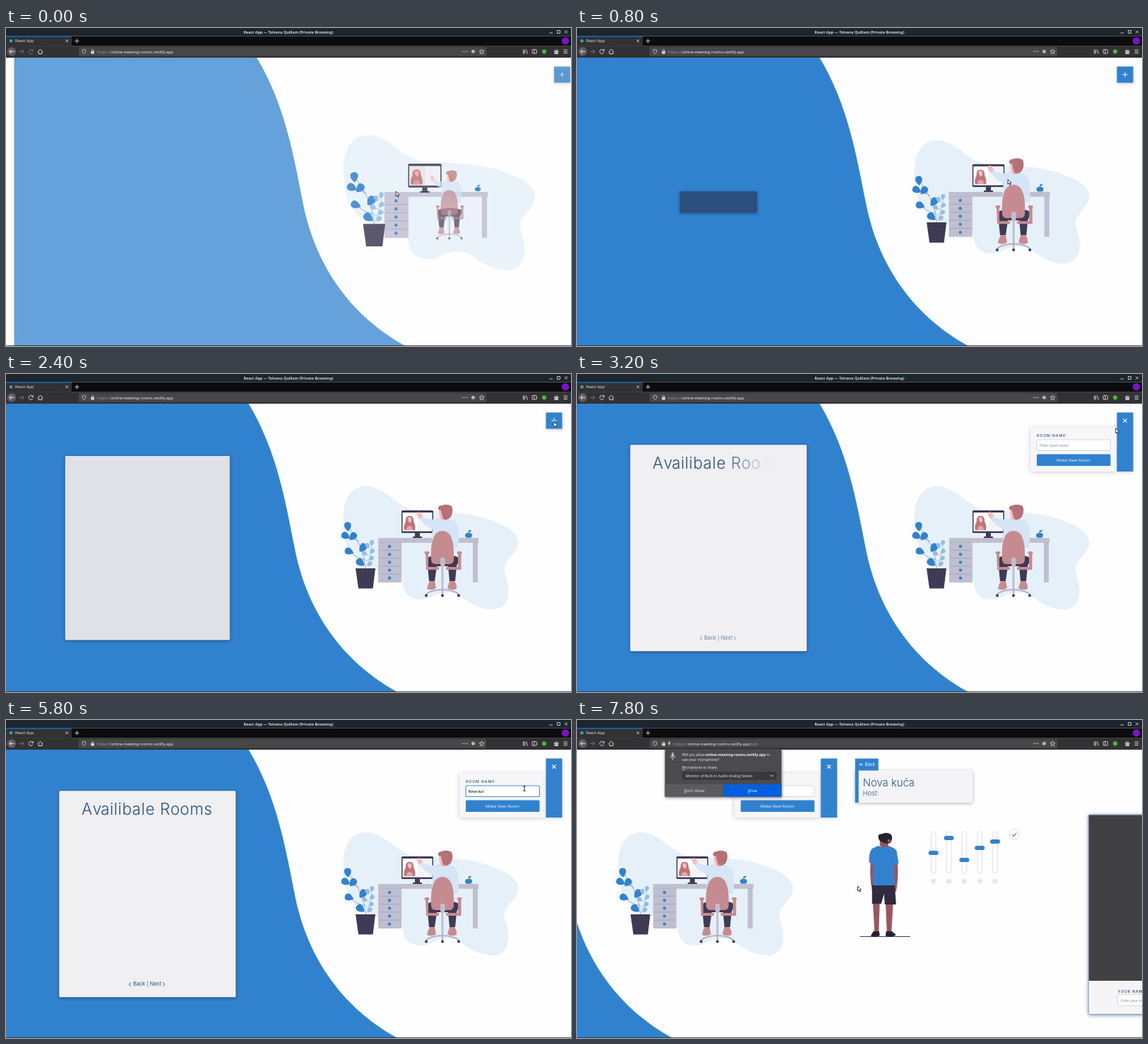
These frames come from a looping animation (800x450 px, 8 s). An HTML page with a canvas:

```html
<!DOCTYPE html>
<html lang="en">
<head>
<meta charset="utf-8">
<title>Online meeting rooms</title>
<style>
html, body { margin: 0; width: 100%; height: 100%; overflow: hidden; background: #fefdff; }
canvas { display: block; width: 100vw; height: 100vh; }
</style>
</head>
<body>
<canvas id="stage" width="800" height="450"></canvas>
<script>
const c = document.getElementById('stage').getContext('2d');
const LOOP = 8000, STEP = 200;
const BLUE = '#3182ce', DARK = '#3f3a55', ROSE = '#c58b91', SKIN = '#f9b9bd', NAVY = '#2c5282';
const UI = '"Open Sans", "Noto Sans", sans-serif';
const HEAD = 'Inter, "Open Sans", sans-serif';
const ROOM = 'Nova kuća';

const clamp = v => Math.max(0, Math.min(1, v));
const lerp = (a, b, p) => a + (b - a) * p;
const ramp = (t, a, b) => clamp((t - a) / (b - a));
const easeOut = p => 1 - (1 - p) ** 2;
const easeInOut = p => p < .5 ? 2 * p * p : 1 - 2 * (1 - p) ** 2;

// Value of [time, ...numbers] keys at time t.
function track(keys, t) {
  let i = 0;
  while (i < keys.length - 2 && t >= keys[i + 1][0]) i++;
  const [a, b] = [keys[i], keys[i + 1]];
  const p = ramp(t, a[0], b[0]);
  return a.slice(1).map((v, k) => lerp(v, b[k + 1], p));
}

function rect(x, y, w, h, color, r = 0) {
  c.fillStyle = color;
  c.beginPath();
  c.roundRect(x, y, w, h, r);
  c.fill();
}
function frame(x, y, w, h, color, r = 0, lw = 1) {
  c.strokeStyle = color;
  c.lineWidth = lw;
  c.beginPath();
  c.roundRect(x, y, w, h, r);
  c.stroke();
}
function dot(x, y, r, color) {
  c.fillStyle = color;
  c.beginPath();
  c.arc(x, y, r, 0, 7);
  c.fill();
}
function fill(d, color) {
  c.fillStyle = color;
  c.fill(new Path2D(d));
}
function line(d, color, lw = 1) {
  c.strokeStyle = color;
  c.lineWidth = lw;
  c.stroke(new Path2D(d));
}
function text(s, x, y, font, color, align = 'left', gap = 0) {
  c.font = font;
  c.fillStyle = color;
  c.textAlign = align;
  c.letterSpacing = gap + 'px';
  c.fillText(s, x, y);
}
function saved(draw) {
  c.save();
  draw();
  c.restore();
}
function shadow(blur, color, dy = 1) {
  c.shadowBlur = blur;
  c.shadowColor = color;
  c.shadowOffsetY = dy;
}

// Letters fade in one after another; p is the fade of the first letter.
function reveal(s, x, y, font, color, p, gap = 0) {
  c.font = font;
  c.letterSpacing = gap + 'px';
  [...s].forEach((ch, i) => saved(() => {
    c.globalAlpha *= clamp(p - .25 * i);
    text(ch, x + c.measureText(s.slice(0, i)).width, y, font, color, 'left', gap);
  }));
}

// ---- desk scene ----
function leaf(x, y, turn, size, color) {
  saved(() => {
    c.translate(x, y);
    c.rotate(turn);
    c.scale(size, size);
    fill('M0 7C-3 4-5.5 1-5-3C-4.5-8 4.5-8 5-3C5.5 1 3 4 0 7Z', color);
  });
}
function backdrop() {
  fill('M478 215C476 190 481 159 510 159C540 160 551 189 582 193C622 195 662 195 694 210' +
    'C718 218 727 232 725 241C721 258 703 264 706 280C709 292 713 300 711 314' +
    'C707 336 688 336 668 329C646 320 644 309 625 309C605 310 602 320 584 319' +
    'C565 317 562 304 560 286C550 277 520 284 500 266C482 250 480 235 478 215Z', '#e6f0f8');
}
function plant() {
  const light = '#93bce6';
  line('M509 275Q508 246 484 215M508 262Q500 262 488 253M506 252L505 244M500 237L481 229M497 234L492 231', '#7f93b5', .7);
  line('M509 275Q518 258 518 238M513 265L506 262M515 257L508 254', light, .7);
  leaf(484, 216, -.1, .95, BLUE);
  leaf(481, 229, -1.1, .95, BLUE);
  leaf(491, 230, .7, .95, BLUE);
  leaf(486, 251, -1.2, .95, BLUE);
  leaf(505, 246, .65, 1, BLUE);
  leaf(502, 267, -.9, 1, BLUE);
  [[518, 239, .2], [512, 243, -.5], [518, 251, .8], [508, 254, -.9], [517, 261, .9], [515, 269, .7]]
    .forEach(([x, y, a]) => leaf(x, y, a, .6, light));
  fill('M495 275H523L519.5 303.5H499Z', DARK);
}
function desk() {
  rect(527, 232, 142, 6, '#c0bfd0');
  rect(661, 238, 7, 57, '#c0bfd0');
  rect(527, 238, 33, 57, '#c0bfd0');
  for (let i = 0; i < 5; i++) {
    if (i) line(`M528 ${238 + 11.3 * i}H559`, '#9c9bb0', .7);
    dot(543, 244 + 11.2 * i, 2.2, BLUE);
  }
  line('M527 238.5H669', '#aeadc2', .6);
}
function monitor() {
  rect(560, 193, 45, 32, DARK, 1.5);
  rect(561.5, 196, 42, 26.5, '#fff');
  rect(583, 197, 20, 24, '#f3f4fa');
  fill('M564 221C562 213 566 212 566 206C566 199 577 199 577 206C577 212 581 213 579 221Z', '#bd767a');
  fill('M568.5 204.500C569 201.500 574.5 201.5 574.5 206C574 212 570 212 568.5 204.500Z', SKIN);
  fill('M567 221C567 213 576 213 576 221Z', '#e5a5aa');
  rect(579, 225, 7, 6, DARK);
  rect(576, 230, 13, 2, DARK);
}
function person() {
  fill('M596 262C596 254 642 254 642 262L638 272L636 293H628L626 272H610L607 293H599Z', DARK);
  fill('M600 293H607L609 303Q603 307 596 304Q597 298 600 293ZM628 293H635Q639 299 638 304Q631 307 625 303Z', ROSE);
  fill('M614 203C606 208 596 206 589 200L585 204C592 214 600 218 604 219L602 246H640Q645 212 632 206Z', '#d5e5f6');
  fill('M590 201L586 205Q581 202 582 196Q587 193 590 201Z', SKIN);
  fill('M613 193H622L625 206Q617 210 615 204Q613 199 613 193Z', SKIN);
  fill('M612 192Q611 186 617 186Q624 183 631 187Q634 194 630 202Q625 208 619 205Q617 199 616 193Z', '#b37276');
  fill('M602 262C601 241 604 222 618 222C632 222 635 241 634 262Q634 269 628 269H608Q602 269 602 262Z', ROSE);
  fill('M594 252H598V273H613V277H595ZM640 252H644.5V277H623V273H640Z', ROSE);
  rect(592.5, 251, 7, 4, ROSE, 2);
  rect(638.5, 251, 7, 4, ROSE, 2);
  rect(615, 260, 6.5, 12, '#c0bfd0', 2);
  rect(616.5, 272, 3, 33, '#c0bfd0');
  line('M595 312Q600 306 618 305Q636 306 641 312M618 303V312', '#b5b4c6', 2.2);
  [595, 618, 641].forEach(x => dot(x, 313.5, 2, DARK));
}
function apple() {
  dot(653.5, 228.3, 3.4, BLUE);
  dot(656.5, 228.3, 3.4, BLUE);
  line('M655 225Q655 222 656 221', DARK, .9);
  fill('M655 224Q656 220 659 221Q658 224 655 224Z', BLUE);
}

// [draw, centre, [scale, dx, dy, alpha] at load, the same one step later]
const parts = [
  [backdrop, 600.5, 245.5, [1.097, 12, 1, .74], [1.017, 3, .5, .94]],
  [desk, 598, 263.5, [1.03, 11, 1, .8], [1.12, 2, 2.5, .98]],
  [plant, 499, 257, [1.12, 11, 0, .85], [1.02, 1.8, 1.3, .98]],
  [monitor, 582.5, 212.5, [1.05, 10.5, 0, .85], [1.14, .5, -3, 1]],
  [person, 619, 250.5, [.75, 9.5, 0, .7], [1.1, 2, 0, 1]],
  [apple, 655, 227, [.85, 13, 0, .85], [1, 9.5, -2, 1]],
];
const rest = [1, 0, 0, 1];
const settle = t => t >= 1400 ? 0 : Math.exp((200 - t) / 220);

function scene(t) {
  for (const [draw, x, y, first, second] of parts) {
    const [s, dx, dy, alpha] = t < 200 ? first : rest.map((v, i) => lerp(v, second[i], settle(t)));
    saved(() => {
      c.globalAlpha = alpha;
      c.translate(x + dx, y + dy);
      c.scale(s, s);
      c.translate(-x, -y);
      draw();
    });
  }
}

// ---- first page ----
function card(t) {
  if (t < 200) return;
  const [cx, bw, bh] = track([[200, 202.5, 45, 12.5], [400, 201, 82, 22], [600, 200.3, 102, 28], [800, 200.3, 109, 30]], t);
  const [p] = track([[2000, 0], [2200, .58], [2400, .88], [2600, .97], [2800, 1]], t);
  const w = lerp(bw, 250, p), h = lerp(bh, 292, p);
  const x = cx - w / 2, y = 246.3 - h / 2;
  const mix = (a, b) => Math.round(lerp(a, b, clamp(p * 1.04)));
  saved(() => {
    shadow(4.5, `rgba(15,35,70,${lerp(.35, .6, ramp(t, 200, 800))})`, 1);
    rect(x, y, w, h, `rgb(${mix(42, 240)},${mix(79, 239)},${mix(124, 241)})`, 1.5);
  });
  if (p < .3) reveal('See Availibale Rooms', 161, 249, `7.6px ${HEAD}`, '#f4f7fb', (t - 1200) / 170);
  if (t >= 2800) {
    reveal('Availibale Rooms', 107, 134, `300 22.4px ${HEAD}`, NAVY, (t - 2600) / 170, .6);
    saved(() => {
      c.globalAlpha = ramp(t, 2800, 3400);
      text('Back | Next', 200, 376, `7.4px ${HEAD}`, NAVY, 'center');
      line('M177 371L174 374L177 377M222 371L225 374L222 377', NAVY, .8);
    });
  }
}

function roomForm(t, shift) {
  const p = easeOut(ramp(t, 2500, 3200));
  const [alpha] = track([[0, .74], [200, .94], [400, 1]], t);
  const left = 764 - 122 * p;
  saved(() => {
    c.globalAlpha = alpha;
    c.translate(shift, 0);
    if (p > 0) {
      saved(() => {
        shadow(6, 'rgba(0,0,0,.2)');
        rect(left, 75, 122 * p, 63, '#f7f7f9', 2);
      });
      saved(() => {
        c.beginPath();
        c.rect(left, 70, 122 * p, 70);
        c.clip();
        c.globalAlpha = ramp(p, .4, 1);
        text('ROOM NAME:', 651, 89, `600 5.2px ${HEAD}`, '#4a6384', 'left', .9);
        const sent = t >= 7200, focus = t >= 3800 && !sent;
        rect(651, 93, 104.5, 15.5, '#fff', 2);
        frame(651, 93, 104.5, 15.5, focus ? '#4590d6' : '#cbd0d8', 2, focus ? 1.1 : .8);
        const typed = t < 5000 || sent ? '' : ROOM.slice(0, Math.ceil((t - 4800) / 200 * 1.5));
        if (typed) text(typed, 654.5, 103, `italic 600 5.3px ${UI}`, '#22262e');
        else if (!sent) text('Enter room name', 655, 103, `italic 5.3px ${UI}`, '#7d8087');
        if (focus && !typed) line('M654.5 97.5V104.5', '#333', .7);
        rect(651, 113.5, 104.5, 16.5, BLUE, 1.5);
        text('Make New Room', 703, 124, `6.1px ${UI}`, '#f2f7fc', 'center');
      });
    }
    saved(() => {
      shadow(5, 'rgba(0,0,0,.22)');
      rect(764.5, 54.5, 23, lerp(23, 83.5, p), BLUE);
    });
    c.translate(776, 66);
    c.rotate(p * Math.PI / 4);
    line('M-3.8 0H3.8M0-3.8V3.8', '#fff', lerp(.9, 1.1, p));
  });
}

function firstPage(t) {
  const [shift, alpha] = track([[0, 11.5, .74], [200, 2, .94], [400, .5, .99], [600, 0, 1]], t);
  saved(() => {
    c.globalAlpha = alpha;
    c.translate(shift, 0);
    fill('M0 40H342L343.5 42C384.5 110 396.5 185 409.5 250C422.5 315 460 398 554 450H0Z', BLUE);
  });
  scene(t);
  card(t);
  roomForm(t, shift);
}

// ---- second page ----
function standing() {
  const brown = '#9d555c', black = '#25222f';
  line('M20 306.5H91', '#3f3d56', 1.2);
  fill('M38 255H48L46.5 300H40.5ZM56 255H67L64.5 300H58Z', brown);
  fill('M39 299H47L48 305Q42 308 35 305.5ZM57 299H65L71 304Q67 308 56 305.5Z', black);
  fill('M35 200H40L39 220L41 240L37 241Q33 222 35 200ZM67 200H73Q75 222 71 243L66 242Z', brown);
  fill('M37 232H69L71 261H55L54 246L50 260H37Z', '#2f2b40');
  fill('M46 178Q53 181 60 178Q70 181 72 186L74.5 203L68 204L69 234H38L39 203L33 202Q32 188 37 182Z', BLUE);
  fill('M48 168H60V179Q53 182 48 178Z', brown);
  fill('M46 167Q44 161 52 161Q58 158 64 162Q67 167 63 174Q55 176 50 172Q47 171 46 167Z', black);
  dot(61, 171, 2.3, brown);
}
function secondPage() {
  saved(() => {
    shadow(5, 'rgba(0,0,0,.3)');
    rect(13, 71, 166.5, 46, '#f4f4f6', 2);
  });
  rect(13, 54.5, 33, 17, BLUE, 1);
  rect(13, 70, 5, 47, BLUE, 1);
  line('M24 63H19.5M21.5 61L19.5 63L21.5 65', '#fff', .8);
  text('Back', 27, 65.3, `6.4px ${UI}`, '#fff');
  text(ROOM, 24, 94, `300 14.8px ${HEAD}`, NAVY);
  text('Host:', 24, 107, `300 9.4px ${HEAD}`, NAVY);
  standing();
  [188, 167, 198, 181, 172].forEach((y, i) => {
    const x = 124 + 21.8 * i;
    frame(x - 3.3, 158, 6.6, 59, '#dedee3', 3, .9);
    rect(x - 7, y - 3, 14, 6, BLUE, 3);
    dot(x, 228, 3.5, '#e6e5e9');
  });
  c.strokeStyle = '#cfd3dc';
  c.lineWidth = .8;
  c.beginPath();
  c.arc(238.5, 162, 7, 0, 7);
  c.stroke();
  line('M235.5 162L237.5 164.5L241.5 159.5', BLUE, 1.1);
  saved(() => {
    shadow(5, 'rgba(20,50,90,.6)');
    rect(343.5, 134, 436, 282.5, '#f5f5f7', 2);
  });
  frame(343.5, 134, 436, 282.5, '#6a9cc4', 2, .8);
  rect(344, 134.5, 435, 234.5, '#414042');
  text('YOUR NAME:', 385, 386, `600 5.2px ${HEAD}`, '#3f5878', 'left', .9);
  rect(385, 388.5, 150, 16, '#fff', 2);
  frame(385, 388.5, 150, 16, '#cbd0d8', 2, .8);
  text('Enter your name', 389, 398.5, `italic 5.3px ${UI}`, '#7d8087');
}

// ---- browser ----
function mic(x, y, s, color) {
  rect(x - s * .3, y - s, s * .6, s * 1.2, color, s * .3);
  line(`M${x - s * .6} ${y - s * .2}Q${x - s * .5} ${y + s * .5} ${x} ${y + s * .5}Q${x + s * .5} ${y + s * .5} ${x + s * .6} ${y - s * .2}M${x} ${y + s * .5}V${y + s}`, color, s * .18);
}
function browser(t) {
  const pale = '#d6d6da', dim = '#77777c', asking = t >= 7600;
  rect(0, 0, 800, 11.5, '#1d252d');
  text('React App — Tolvena Quillam (Private Browsing)', 400, 7.7, `bold 5.3px ${UI}`, '#d0d5d9', 'center');
  line('M769.5 7H774M791 3.5L795 7.5M795 3.5L791 7.5', pale, .9);
  frame(780.5, 3.5, 4, 4, pale, 0, .9);
  rect(0, 11.5, 800, 14, '#0c0c0e');
  rect(0, 11.5, 93, 14, '#323234');
  rect(0, 11.3, 93, 1.2, '#0a74d8');
  dot(7, 18.3, 2.3, '#3f9fb8');
  text('React App', 13, 20.3, `5.6px ${UI}`, '#f0f0f2');
  line('M84.5 16.5L88 20M88 16.5L84.5 20M97.5 18.3H103.5M100.5 15.3V21.3', pale, .9);
  dot(792, 18.3, 5.2, '#7c12c8');

  rect(0, 25.3, 800, 16.7, '#323234');
  dot(8, 33.3, 6.3, '#5b5b5f');
  line('M11.5 33.3H5M7.8 30.3L5 33.3L7.8 36.3', '#f0f0f2', 1);
  line('M18.5 33.3H25M22.2 30.3L25 33.3L22.2 36.3', dim, 1);
  line('M37.6 31.5A3 3 0 1 0 38 34.5M38.4 29.8V32.3H36', t < 200 ? dim : pale, 1);
  line('M45 33.5L48.5 30L52 33.5M46 33V36.5H51V33', pale, 1);
  rect(103, 27, 577, 12.7, '#47474a', 1.5);
  line('M110.5 30.3L113 31.2Q113 35.5 110.5 36.6Q108 35.5 108 31.2Z', pale, .8);
  rect(120.3, 32.8, 4.6, 3.6, pale, .5);
  line('M121.2 33V31.5Q122.6 29.5 124 31.5V33', pale, .8);
  if (asking) mic(130.5, 33.3, 3, pale);
  const x = asking ? 137 : 129, font = `5.7px ${UI}`;
  text('https://', x, 35.5, font, '#9b9b9f');
  let end = x + c.measureText('https://').width;
  text('online-meeting-rooms.netlify.app', end, 35.5, font, '#f5f5f7');
  end += c.measureText('online-meeting-rooms.netlify.app').width;
  if (t >= 7200) text('/join', end, 35.5, font, '#9b9b9f');
  [647, 650, 653].forEach(v => dot(v, 33.3, .8, pale));
  dot(661.5, 33.3, 2.5, '#b4b4b8');
  line('M673.5 30L674.5 32.3L677 32.5L675 34.2L675.7 36.7L673.5 35.3L671.3 36.7L672 34.2L670 32.5L672.5 32.3Z', pale, .8);
  line('M732.5 30.5V36.5M734.5 30.5V36.5M736.5 30.5L738.5 36.5', pale, 1);
  frame(745, 30.5, 6.5, 5.5, pale, 1, .9);
  line('M748 30.5V36', pale, .9);
  dot(762, 33.3, 3.1, '#4fb53c');
  rect(776, 32, 6.5, 1.6, pale);
  rect(776.6, 34.2, 5.3, 2.6, pale);
  line('M777.5 30L779.3 31.8L781 30', pale, .8);
  line('M789.5 31H795M789.5 33.3H795M789.5 35.6H795', pale, .9);
  rect(0, 449.2, 800, .8, '#26282b');
  if (asking) permission();
}
function permission() {
  const ink = '#f1f1f3', font = `5.1px ${UI}`, bold = `bold 5.1px ${UI}`;
  saved(() => {
    shadow(4, 'rgba(0,0,0,.5)');
    rect(124.5, 41, 165, 67.5, '#4a4a4f');
  });
  mic(135.5, 51.5, 5.5, '#b9b9bd');
  text('Will you allow ', 148.5, 51, font, ink);
  const x = 148.5 + c.measureText('Will you allow ').width;
  text('online-meeting-rooms.netlify.app', x, 51, bold, ink);
  text(' to', x + c.measureText('online-meeting-rooms.netlify.app').width, 51, font, ink);
  text('use your microphone?', 148.5, 57.5, font, ink);
  text('Microphone to share:', 148.5, 69, font, ink);
  line('M148.5 70.3H153', ink, .5);
  rect(148, 72.5, 135, 13, '#38383d', 1);
  frame(148, 72.5, 135, 13, '#54545a', 1, .7);
  text('Monitor of Built-in Audio Analog Stereo', 154, 80.7, `5.2px ${UI}`, ink);
  line('M273.5 78L275.5 80L277.5 78', ink, 1);
  rect(124.5, 91, 83, 17.5, '#5a5a5f');
  rect(207.5, 91, 82, 17.5, '#0060df');
  text("Don't Allow", 166, 101.5, `5.5px ${UI}`, ink, 'center');
  text('Allow', 248.5, 101.5, `5.5px ${UI}`, '#fff', 'center');
  line('M151.5 103H155M241.5 103H245', ink, .5);
}

// ---- pointer ----
const pointerPath = [
  [0, 552, 231], [200, 622, 208], [800, 610, 214], [1200, 540, 226], [1600, 424, 237], [1800, 246, 248],
  [2000, 244, 249], [2200, 520, 150], [2400, 776, 67], [3000, 776, 67], [3600, 736, 96], [4000, 734, 97],
  [6000, 734, 97], [6400, 706, 121], [6800, 703, 124], [7000, 699.5, 132], [7200, 690, 140],
  [7600, 450, 220], [7800, 397.5, 235], [8000, 397.5, 235],
];
function pointer(t) {
  const [x, y] = track(pointerPath, t);
  const onButton = t === 1800 || t === 2000 || (t >= 2400 && t <= 3000) || (t >= 6400 && t <= 6800);
  const onField = t >= 3600 && t <= 6000;
  saved(() => {
    c.translate(x, y);
    c.lineJoin = 'round';
    if (onField) {
      line('M-1.8-3.2H1.8M0-3.2V3.2M-1.8 3.2H1.8', '#222', 1);
      return;
    }
    const d = onButton
      ? 'M0 0Q1.2-.8 1.5 .8V2.5L4 3.3Q4.5 5 3.5 6.8H.3L-1.8 4Q-1.3 3 0 4Z'
      : 'M0 0V7L1.6 5.6L2.8 8.2L4 7.6L2.9 5.2H5Z';
    fill(d, '#fff');
    line(d, '#26262c', .9);
  });
}

function draw(now) {
  const t = Math.floor(now % LOOP / STEP) * STEP;
  const slide = 800 * easeInOut(ramp(t, 7000, 8562));
  c.setTransform(1, 0, 0, 1, 0, 0);
  rect(0, 0, 800, 450, '#fefdff');
  saved(() => {
    c.translate(-slide, 0);
    firstPage(t);
  });
  if (slide > 0) saved(() => {
    c.translate(800 - slide, 0);
    secondPage();
  });
  browser(t);
  pointer(t);
}

const start = performance.now();
function tick() {
  draw(performance.now() - start);
  requestAnimationFrame(tick);
}
tick();
</script>
</body>
</html>
```
